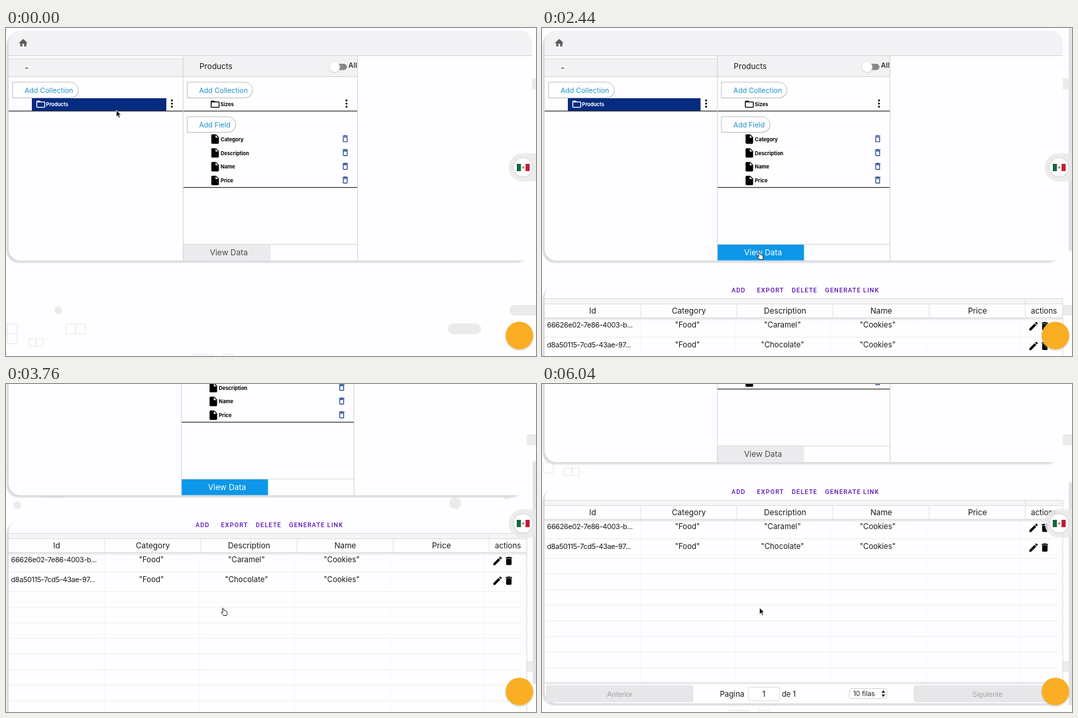
An HTML page for the animation above (7 s loop, 800 by 495 pixels).

```html
<!DOCTYPE html>
<html lang="en">
<head>
<meta charset="utf-8">
<title>Collection editor</title>
<style>
html, body { margin: 0; width: 100%; height: 100%; overflow: hidden; background: #fefdff; }
svg { display: block; width: 100vw; height: 100vh; }
text { font-family: Inter, sans-serif; white-space: pre; }
.bold { font-weight: 700; }
.tool { font-family: Roboto, sans-serif; font-weight: 500; letter-spacing: 1.05px; }
.plain { font-family: "Liberation Sans", sans-serif; }
.id { letter-spacing: -.35px; }
</style>
</head>
<body>
<svg id="stage" viewBox="0 0 800 495" xmlns="http://www.w3.org/2000/svg"></svg>
<script>
const LOOP = 7000, STEP = 40;
const WIDE = 790, NARROW = 782, LEFT = 4;
const stage = document.getElementById('stage');

const ICONS = {
  home: 'M10 20v-6h4v6h5v-8h3L12 3 2 12h3v8z',
  folder: 'M20 6h-8l-2-2H4c-1.1 0-2 .9-2 2v12c0 1.1.9 2 2 2h16c1.1 0 2-.9 2-2V8c0-1.1-.9-2-2-2zm0 12H4V8h16z',
  file: 'M6 2c-1.1 0-2 .9-2 2v16c0 1.1.9 2 2 2h12c1.1 0 2-.9 2-2V8l-6-6zm7 7V3.500l5.500 5.500z',
  binLine: 'M6 19c0 1.100.9 2 2 2h8c1.100 0 2-.9 2-2V7H6zM8 9h8v10H8zm7.500-5l-1-1h-5l-1 1H5v2h14V4z',
  bin: 'M6 19c0 1.100.9 2 2 2h8c1.100 0 2-.9 2-2V7H6zM19 4h-3.500l-1-1h-5l-1 1H5v2h14z',
  pencil: 'M3 17.250V21h3.750L17.810 9.940l-3.750-3.750zM20.710 7.040a1 1 0 0 0 0-1.410l-2.340-2.340a1 1 0 0 0-1.410 0l-1.830 1.830 3.750 3.750z'
};

const rect = (x, y, w, h, fill, more = '') =>
  `<rect x="${x}" y="${y}" width="${w}" height="${h}" fill="${fill}" ${more}/>`;
const circle = (x, y, r, fill, more = '') =>
  `<circle cx="${x}" cy="${y}" r="${r}" fill="${fill}" ${more}/>`;
const line = (x1, y1, x2, y2, color, w = 1) =>
  `<path d="M${x1} ${y1}L${x2} ${y2}" stroke="${color}" stroke-width="${w}"/>`;
const text = (s, x, y, size, fill = '#1c1c1e', more = '') =>
  `<text x="${x}" y="${y}" font-size="${size}" fill="${fill}" ${more}>${s}</text>`;
const mid = (s, x, y, size, fill, more = '') => text(s, x, y, size, fill, 'text-anchor="middle" ' + more);
// Icon centred on x, y with its 24-unit grid drawn at the given size
const icon = (name, x, y, size, fill, sx = 1) =>
  `<path transform="translate(${x} ${y}) scale(${size / 24 * sx} ${size / 24}) translate(-12 -12)" d="${ICONS[name]}" fill="${fill}"/>`;
const dots = (x, y) => [-4.8, 0, 4.8].map(d => circle(x, y + d, 1.5, '#111')).join('');

function addButton(label, x, y, w) {
  const shape = `M${x} ${y}h${w - 12}a11.75 11.75 0 0 1 0 23.5h${12 - w}z`;
  return `<path d="${shape}" transform="translate(.5 1)" fill="#ddd"/>` +
    `<path d="${shape}" fill="#fefdff" stroke="#bcbcbe" stroke-width=".9"/>` +
    text(label, x + 18, y + 16, 10.6, '#2092c4');
}

function card(x, y, w, h) {
  return rect(x - 3, y + 3, w - 2, h, '#d9d8db', 'rx="18" filter="url(#soft)"') +
    rect(x, y, w, h, '#fefdff', 'rx="18"');
}

function editor(width, id) {
  const col = width / 3, c1 = LEFT + col, c2 = c1 + col, end = LEFT + width;
  let s = `<g id="${id}">` + card(LEFT, 4, width, 347) +
    `<path d="M4 41.500V22a18 18 0 0 1 18-18H${end - 18}a18 18 0 0 1 18 18V41.500z" fill="#f3f2f4"/>` +
    line(4, 41.7, end, 41.7, '#d2d1d4') +
    icon('home', 26, 22.5, 16, '#5d5d60') +
    rect(4, 46, col, 28, '#f2f1f3') + line(4, 46.5, c1, 46.5, '#dcdbde') +
    rect(c1, 42, col, 32, '#f2f1f3') + line(4, 73.5, c2, 73.5, '#d2d1d4') +
    text('-', 28.5, 64, 12) + text('Products', c1 + 24.7, 62, 11.8) +
    rect(c2 - 37, 54, 21, 9.5, '#878789', 'rx="4.750"') +
    circle(c2 - 34.4, 59.6, 7.6, '#cfcfd1', 'filter="url(#soft)"') +
    circle(c2 - 34.4, 58.8, 7.4, '#fff') +
    text('All', c2 - 13.8, 60, 10.8, '#222', 'font-weight="500"') +
    addButton('Add Collection', 10, 81.800, 99.5) +
    rect(39, 106, c1 - 25.3 - 39, 19, '#032b80') +
    icon('folder', 52.5, 115, 16, '#fff') +
    text('Products', 60.5, 117.800, 7.6, '#fff', 'class="bold"') +
    dots(c1 - 17, 114) + line(4, 125.4, c1, 125.4, '#3b3b3d', 1.2) +
    addButton('Add Collection', c1 + 6.2, 81.800, 99) +
    icon('folder', c1 + 48.3, 115, 16, '#000') +
    text('Sizes', c1 + 56.5, 117.800, 7.6, '#000', 'class="bold"') +
    dots(c2 - 16.7, 114) + line(c1, 125.4, c2, 125.4, '#3b3b3d', 1.2) +
    addButton('Add Field', c1 + 6.2, 133.800, 73.5);
  ['Category', 'Description', 'Name', 'Price'].forEach((name, i) => {
    const y = 167.700 + i * 20.8;
    s += icon('file', c1 + 48.3, y, 17, '#000') +
      text(name, c1 + 56.7, y + 3, 7.6, '#000', 'class="bold"') +
      icon('binLine', c2 - 18.6, y - .6, 14, '#173c85');
  });
  return s + line(c1, 240.7, c2, 240.7, '#3b3b3d', 1.2) +
    line(c1, 326.5, c2, 326.5, '#d9d8db') +
    rect(c1 + .5, 327, col / 2, 23.7, '#ebeaec', 'class="view"') +
    mid('View Data', c1 + 69, 343.2, 12, '#4c4c4e', 'class="viewText"') +
    line(c1, 42, c1, 351, '#d2d1d4') + line(c2, 42, c2, 351, '#d2d1d4') + '</g>';
}

function table() {
  const ink = '#1b1b1d', faint = '#eeedf0', right = 786;
  let s = '<g id="table">' + card(LEFT, 388, 782, 327);
  [['ADD', 286], ['EXPORT', 324.5], ['DELETE', 377], ['GENERATE LINK', 427.3]].forEach(([label, x]) => {
    s += text(label, x, 399.4, 9.3, '#5a12b8', 'class="tool"');
  });
  s += rect(4, 408, 782, 8.5, '#f5f4f6') + line(4, 408.5, right, 408.5, '#dcdbde') +
    line(729.5, 408, 729.5, 416, '#e2e1e4') +
    rect(4, 437, 782, 5, 'url(#fade)') + rect(4, 416, 782, 21, '#fefdff') +
    line(4, 416.5, right, 416.5, '#dcdbde') + line(4, 437, right, 437, '#e4e3e6');
  ['Id', 'Category', 'Description', 'Name', 'Price'].forEach((name, i) => {
    s += mid(name, 76.5 + i * 145.2, 430.7, 11.8, ink) +
      line(149 + i * 145.1, 417, 149 + i * 145.1, 437, '#e2e1e4') +
      line(148.5 + i * 143.5, 442, 148.5 + i * 143.5, 685, '#f5f4f6');
  });
  s += mid('actions', 757.7, 430.7, 11.5, ink);
  const rows = [['66626e02-7e86-4003-b...', 'Caramel'], ['d8a50115-7cd5-43ae-97...', 'Chocolate']];
  rows.forEach(([id, kind], i) => {
    const y = 452.2 + i * 29.8;
    s += text(id, 7.5, y, 10.9, ink, 'class="id"') +
      mid('"Food"', 219.5, y, 11.4, ink) + mid(`"${kind}"`, 363, y, 11.4, ink) +
      mid('"Cookies"', 506.7, y, 11.4, ink) +
      icon('pencil', 742, y - 2.2, 17, '#080808') + icon('bin', 759, y - 2.2, 16.5, '#080808') +
      line(4, 466.5 + i * 29.8, 778, 466.5 + i * 29.8, faint);
  });
  for (let i = 1; i < 8; i++) s += line(4, 496.3 + i * 23.55, 778, 496.3 + i * 23.55, faint);
  s += rect(4, 681, 782, 4, 'url(#rise)') + line(4, 685, right, 685, '#dad9dc') +
    rect(6, 687.5, 222.5, 26, '#e7e6e8', 'rx="3"') + rect(561, 687.5, 222.5, 26, '#e7e6e8', 'rx="3"') +
    mid('Anterior', 117.5, 704.5, 11, '#a3a2a5', 'class="plain"') +
    mid('Siguiente', 672.5, 704.5, 11, '#a3a2a5', 'class="plain"') +
    text('Pagina', 268.5, 704.7, 11.5, ink) +
    rect(311.5, 690.5, 47.5, 20.5, '#fff', 'rx="3" stroke="#dedde0"') +
    mid('1', 335, 705, 11.8, ink) + text('de 1', 362, 704.7, 11.2, ink) +
    rect(464, 692.5, 56.5, 15, '#fff', 'rx="3" stroke="#d2d1d4"') +
    text('10 filas', 469.7, 704, 10, ink) +
    '<path d="M512.500 699l2.700-4 2.700 4zM512.500 701.500l2.700 4 2.700-4z" fill="#222"/>' +
    line(786, 408, 786, 700, '#d8d7da');
  return s + '</g>';
}

function backdrop() {
  const tone = '#ebeaec';
  const pills = [[760, 418, 60, 16], [667, 446, 50, 16], [638, 224, 50, 16], [8, 233, 74, 16], [50, 156, 42, 16]];
  const discs = [[79, 426, 5.7], [708, 217, 5.7], [17, 183, 5.7], [678, 180, 9], [756, 166, 8.5]];
  const boxes = [[2, 446.5, 15], [2, 461.5, 15], [-13, 446.5, 15], [90.5, 447, 14.500], [105, 447, 14.500],
    [34, 469, 11], [45, 469, 11], [2, 119, 15], [34, 127, 11], [45, 127, 11],
    [282, 492.5, 15], [297, 492.5, 15], [328, 492.5, 15], [752.5, 217, 11]];
  return rect(0, 0, 800, 495, '#fefdff') +
    pills.map(([x, y, w, h]) => rect(x, y, w, h, tone, 'rx="8"')).join('') +
    rect(786, 76, 20, 16.5, tone, 'rx="1"') +
    discs.map(d => circle(...d, tone)).join('') +
    boxes.map(([x, y, a]) => rect(x, y, a, a, 'none', 'stroke="#e6e5e8" stroke-width=".9"')).join('');
}

function overlays() {
  return rect(795, 0, 5, 337, '#e3e2e5', 'id="thumb" rx="2"') +
    '<path d="M800 189H780a21 21 0 0 0 0 42.500H800z" fill="#e9e8ea" opacity=".85"/>' +
    circle(780.5, 210.3, 14.8, '#fff', 'stroke="#cfced1" stroke-width="1"') +
    rect(771, 205, 19.5, 11, '#fff') + rect(771, 205, 6.3, 11, '#17683f') +
    rect(784.2, 205, 6.3, 11, '#c01c35') + circle(780.8, 210.4, 1.7, '#a58b62') +
    circle(775, 465.500, 21, '#b9b5ad', 'opacity=".6" filter="url(#soft)"') +
    circle(775, 464, 20.8, '#f9ae23');
}

const pointers =
  '<g id="arrow"><path d="M0 0V10.200L2.400 8 4 11.700 5.800 10.900 4.200 7.300H7.200z" fill="#0a0a0a" stroke="#fff" stroke-width=".8"/></g>' +
  '<g id="hand"><path d="M1.200 1.200Q2.300 0 3.200 1.500L4 4.600Q5.100 4.200 5.600 5 6.600 4.700 7.100 5.500 8.500 5.300 8.500 7V9Q8.500 10.500 7.500 12H3.200Q1.800 9.900-.3 7.800-.5 6.400 1 6.900L2 7.500z" fill="#fff" stroke="#111" stroke-width=".9" stroke-linejoin="round"/></g>';

stage.innerHTML = `<defs>
  <filter id="soft" x="-10%" y="-10%" width="120%" height="120%"><feGaussianBlur stdDeviation="1"/></filter>
  <linearGradient id="fade" x2="0" y2="1"><stop stop-color="#dcdbde"/><stop offset="1" stop-color="#fefdff"/></linearGradient>
  <linearGradient id="rise" x2="0" y2="1"><stop stop-color="#fefdff"/><stop offset="1" stop-color="#e6e5e8"/></linearGradient>
</defs>` + backdrop() +
  `<g id="page">${editor(WIDE, 'wide')}${editor(NARROW, 'narrow')}${table()}</g>` +
  overlays() + pointers;

const el = id => document.getElementById(id);
const page = el('page'), thumb = el('thumb'), arrow = el('arrow'), hand = el('hand');
const views = stage.querySelectorAll('.view'), labels = stage.querySelectorAll('.viewText');
const show = (node, on) => node.setAttribute('display', on ? 'inline' : 'none');

// Piecewise track: rows of [time, value, ...], linear between rows
function track(keys, t) {
  if (t <= keys[0][0]) return keys[0].slice(1);
  for (let i = 1; i < keys.length; i++) {
    const a = keys[i - 1], b = keys[i];
    if (t <= b[0]) {
      const k = (t - a[0]) / (b[0] - a[0]);
      return a.slice(1).map((v, j) => v + (b[j + 1] - v) * k);
    }
  }
  return keys[keys.length - 1].slice(1);
}

const MOVE = [[40, 166.500, 124], [240, 180, 132], [480, 223, 162], [720, 281, 208],
  [880, 316, 265.5], [1040, 325, 303], [1200, 328, 328], [1360, 328.300, 337.5]];
const SCROLL = [[2920, 0], [2960, 2], [3040, 16], [3120, 38], [3240, 87], [3400, 143], [3520, 165],
  [3680, 180], [3840, 185], [4200, 185], [4320, 189], [4400, 204], [4480, 222], [4560, 233]];
const OPEN = 1760, LEAVE = 3840;

function draw(now) {
  const t = Math.floor(now % LOOP / STEP) * STEP;
  const [x, y] = track(MOVE, t);
  const scroll = Math.round(track(SCROLL, t)[0]);
  const open = t >= OPEN;
  const hover = y >= 327 && t < LEAVE;

  page.setAttribute('transform', `translate(0 ${-scroll})`);
  show(el('wide'), !open);
  show(el('narrow'), open);
  show(el('table'), open);
  show(thumb, open);
  thumb.setAttribute('y', scroll * .635);
  views.forEach(v => v.setAttribute('fill', hover ? '#0c97e8' : '#ebeaec'));
  labels.forEach(v => v.setAttribute('fill', hover ? '#fff' : '#4c4c4e'));
  show(arrow, !hover);
  show(hand, hover);
  arrow.setAttribute('transform', `translate(${x} ${y})`);
  hand.setAttribute('transform', `translate(${x - 3} ${y})`);
}

function tick() {
  draw(performance.now());
  requestAnimationFrame(tick);
}
tick();
</script>
</body>
</html>
```
